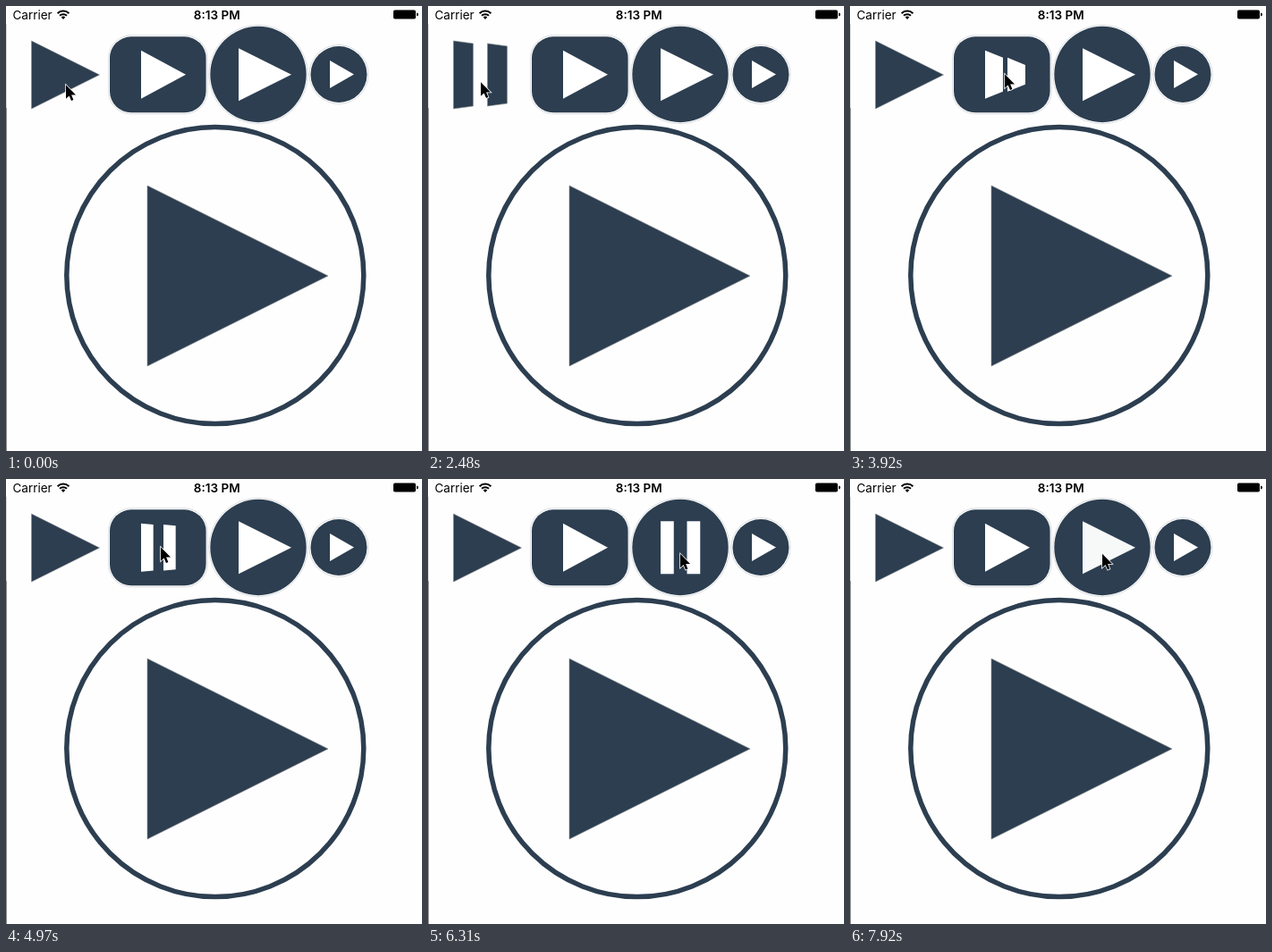
An HTML page that plays this animation: 465 px wide and 498 px high, repeating every 8 s.

```html
<!DOCTYPE html>
<html lang="en">
<head>
<meta charset="utf-8">
<title>Play buttons</title>
<style>
  html, body { margin: 0; width: 100%; height: 100%; overflow: hidden; background: #fefefe; }
  svg { display: block; width: 465px; height: 498px; }
  text { font: 13.5px Inter, "Liberation Sans", sans-serif; fill: #000; }
  .time { font-weight: 600; text-anchor: middle; }
  .navy { fill: #2c3e50; }
  .rim { fill: none; stroke: #2c3e50; stroke-opacity: .25; stroke-width: .7; }
  .dark { fill: #2c3e50; stroke: #85898c; stroke-width: .6; }
  .light { fill: #fff; }
</style>
</head>
<body>
<svg viewBox="0 0 465 498">
  <rect width="465" height="498" fill="#fefefe"/>
  <rect y="20" width="1" height="94" fill="#d8d8d8"/>
  <rect y="114" width="1" height="384" fill="#8c8c8c"/>

  <text x="7.5" y="14.5">Carrier</text>
  <g fill="none" stroke="#000" stroke-width="2">
    <path d="M57.6 8.2a9.2 9.2 0 0 1 12.8 0M60 10.8a5.8 5.8 0 0 1 8 0"/>
    <path d="M64 15l-2.3-2.5a3.3 3.3 0 0 1 4.6 0z" fill="#000" stroke="none"/>
  </g>
  <text class="time" x="235.7" y="14.5">8:13 PM</text>
  <rect x="433" y="4.5" width="25" height="10" rx="1.8"/>
  <path d="M459 7.5q2 .3 2 2t-2 2z"/>

  <rect class="navy" x="116" y="34.3" width="107.6" height="85" rx="24"/>
  <rect class="rim" x="114.5" y="32.8" width="110.6" height="88" rx="25.5"/>
  <circle class="navy" cx="282" cy="76.5" r="53.7"/>
  <circle class="rim" cx="282" cy="76.5" r="55.2"/>
  <circle class="navy" cx="372" cy="76.5" r="31.5"/>
  <circle class="rim" cx="372" cy="76.5" r="33"/>
  <circle cx="233.8" cy="301.6" r="166" fill="none" stroke="#2c3e50" stroke-width="5.5"/>
  <g id="icons"></g>

  <path id="cursor" d="M1 1.3V16.8L4.6 13.5L7 19L9.4 18L7.1 12.6H12Z"
        fill="#000" stroke="#fff" stroke-width="1.5" paint-order="stroke"/>
</svg>
<script>
const LOOP = 8000;

// left, top, width, height, class, toggles as [start, end, target]
const icons = [
  [28.5, 39, 76, 76, "dark", [[1230, 1430, 1], [2450, 2650, 0]]],
  [151, 49.8, 50, 54, "light", [[3760, 4160, 1], [4940, 5270, 0]]],
  [260, 47.2, 59, 59, "light", [[6110, 6310, 1], [7120, 7285, 0]]],
  [362, 61, 27, 31, "light", []],
  [158, 201, 202, 202, "dark", []]
];

// start, end, x, y
const moves = [
  [3130, 3550, 172, 75],
  [5420, 5870, 281, 82.5]
];

const clamp = v => Math.min(1, Math.max(0, v));
const mix = (a, b, p) => a + (b - a) * p;
const smooth = p => p * p * (3 - 2 * p);
const cursor = document.getElementById("cursor");

const paths = icons.map(icon => {
  const path = document.createElementNS("http://www.w3.org/2000/svg", "path");
  path.setAttribute("class", icon[4]);
  document.getElementById("icons").append(path);
  return path;
});

// 0 is a triangle, 1 is two bars; each half morphs on its own.
function iconPath([x, y, w, h], p) {
  if (p === 0) return `M${x} ${y}L${x + w} ${y + h / 2}L${x} ${y + h}Z`;
  const half = (from, to, inA, inB) => {
    const l = x + w * from, r = x + w * to;
    const a = h * inA * (1 - p), b = h * inB * (1 - p);
    return `M${l} ${y + a}L${r} ${y + b}V${y + h - b}L${l} ${y + h - a}Z`;
  };
  return half(0, mix(.5, .25, p), 0, .25) + half(.5, mix(1, .75, p), .25, .5);
}

function progress(toggles, t) {
  return toggles.reduce((p, [start, end, target]) =>
    mix(p, target, clamp((t - start) / (end - start))), 0);
}

function cursorAt(t) {
  let pos = t < 30 ? [66, 87] : t < 120 ? [62, 85] : [58, 84];
  for (const [start, end, x, y] of moves) {
    const p = smooth(clamp((t - start) / (end - start)));
    pos = [mix(pos[0], x, p), mix(pos[1], y, p)];
  }
  return pos;
}

function draw(t) {
  icons.forEach((icon, i) =>
    paths[i].setAttribute("d", iconPath(icon, progress(icon[5], t))));
  const dim = clamp((t - 7750) / 170);
  paths[2].style.fill = `rgb(${255 - 8 * dim}, ${255 - 6 * dim}, ${255 - 6 * dim})`;
  cursor.setAttribute("transform", `translate(${cursorAt(t)})`);
}

const began = performance.now();
function tick() {
  draw((performance.now() - began) % LOOP);
  requestAnimationFrame(tick);
}
tick();
</script>
</body>
</html>
```
